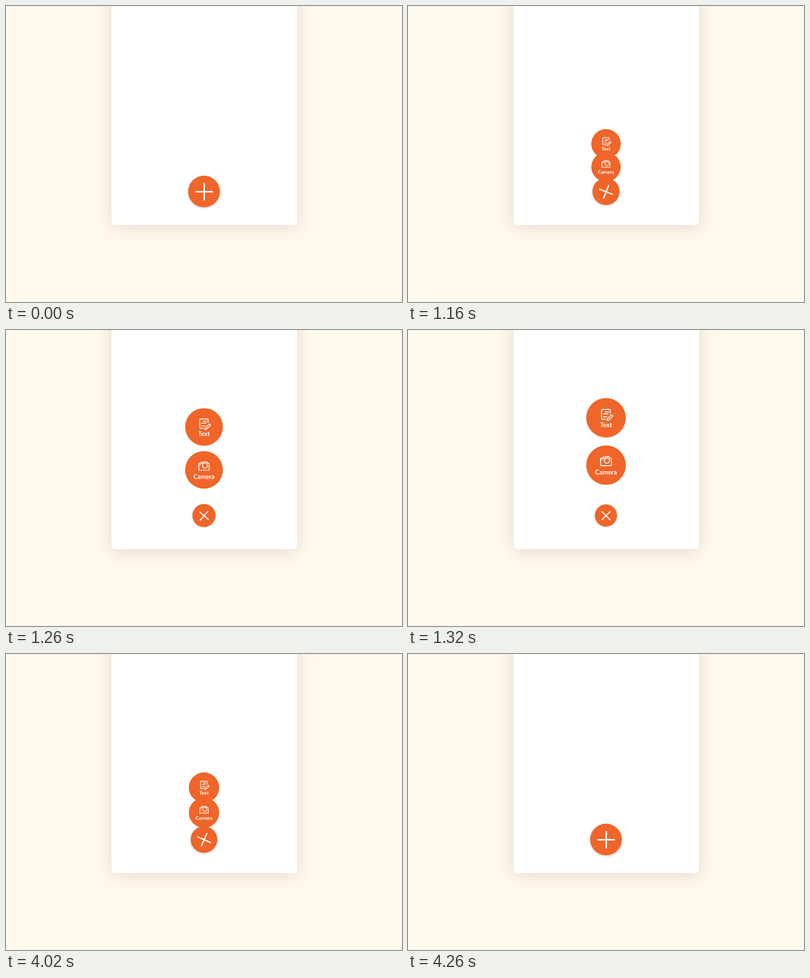
An HTML page with a canvas for the animation above (5.36 s loop, 800 px wide and 600 px high).

```html
<!DOCTYPE html>
<html lang="en">
<head>
<meta charset="utf-8">
<title>Add menu</title>
<style>
  html, body { margin: 0; width: 100%; height: 100%; overflow: hidden; background: #fff9ed; }
  canvas { display: block; width: 800px; height: 600px; }
</style>
</head>
<body>
<canvas id="stage" width="800" height="600"></canvas>
<script>
const ctx = document.getElementById('stage').getContext('2d');
const ORANGE = '#f06529';
const LOOP = 5360, STEP = 20;
const OPEN = { start: 1080, duration: 240, ease: bezier(0, 0, 0.58, 1) };
const CLOSE = { start: 3920, duration: 360, ease: bezier(0.25, 0.1, 0.25, 1) };
const HOME = { x: 400, y: 376 };

const noteIcon = new Path2D(
  'M8.6 -9.5V-15.2Q8.6 -17 6.8 -17H-7.2Q-9 -17 -9 -15.2V1.2Q-9 3 -7.2 3H-0.5' +
  'M-2 -12H5.3M-5 -8H4.5M-5.5 -2.2H1.8' +
  'M2 5.6L3.2 1.6L10.2 -5.5Q11.5 -6.6 12.8 -5.4T13 -2.7L6 4.4Z');
const cameraIcon = new Path2D(
  'M-4 -14H-9.5Q-11 -14 -11 -12.5V-0.5Q-11 1 -9.5 1H9.5Q11 1 11 -0.5V-12.5Q11 -14 9.5 -14H8' +
  'L6.3 -17H-1.5L-3.3 -14H-4M-5.5 -17.5V-14M-8.8 -10.7H-7.2' +
  'M7.2 -9A5.2 5.2 0 1 1 -3.2 -9A5.2 5.2 0 1 1 7.2 -9');

const items = [
  { label: 'Text', y: 178, icon: noteIcon },
  { label: 'Camera', y: 274, icon: cameraIcon }
];

function bezier(x1, y1, x2, y2) {
  const curve = (a, b, s) => 3 * a * s * (1 - s) ** 2 + 3 * b * s * s * (1 - s) + s ** 3;
  return x => {
    if (x <= 0) return 0;
    if (x >= 1) return 1;
    let low = 0, high = 1;
    for (let i = 0; i < 30; i++) {
      const mid = (low + high) / 2;
      if (curve(x1, x2, mid) < x) low = mid; else high = mid;
    }
    return curve(y1, y2, low);
  };
}

const phase = (t, { start, duration, ease }) => ease((t - start) / duration);

function setShadow(color, blur, dx, dy) {
  ctx.shadowColor = color;
  ctx.shadowBlur = blur;
  ctx.shadowOffsetX = dx;
  ctx.shadowOffsetY = dy;
}

function disc(radius) {
  ctx.fillStyle = ORANGE;
  ctx.beginPath();
  ctx.arc(0, 0, radius, 0, Math.PI * 2);
  ctx.fill();
}

function drawCard() {
  ctx.fillStyle = '#fff9ed';
  ctx.fillRect(0, 0, 800, 600);
  ctx.save();
  setShadow('rgba(0,0,0,0.12)', 36, 0, 4);
  ctx.fillStyle = '#fff';
  ctx.beginPath();
  ctx.roundRect(213, -220, 375, 664, 8);
  ctx.fill();
  ctx.restore();
}

function drawItem({ label, y, icon }, open) {
  const scale = 0.5 + 0.5 * open;
  ctx.save();
  ctx.translate(HOME.x, HOME.y + (y - HOME.y) * open);
  ctx.scale(scale, scale);
  disc(40);
  ctx.strokeStyle = ctx.fillStyle = '#fff';
  ctx.lineWidth = 1.8;
  ctx.lineCap = ctx.lineJoin = 'round';
  ctx.stroke(icon);
  ctx.font = '700 13px Lato, sans-serif';
  ctx.textAlign = 'center';
  ctx.fillText(label, 0, 19);
  ctx.restore();
}

function drawButton(open) {
  const scale = 1 - 0.3 * open;
  const angle = open * Math.PI / 4;
  const drop = 2 * scale;
  ctx.save();
  ctx.translate(HOME.x, HOME.y);
  ctx.rotate(angle);
  ctx.scale(scale, scale);
  // Canvas shadows ignore transforms, so the offset is turned by hand.
  setShadow('rgba(0,0,0,0.2)', 5 * scale, -drop * Math.sin(angle), drop * Math.cos(angle));
  disc(32);
  setShadow('transparent', 0, 0, 0);
  ctx.fillStyle = '#fff';
  ctx.fillRect(-17, -1, 35, 3);
  ctx.fillRect(-1, -17, 3, 35);
  ctx.restore();
}

function render(now) {
  const t = Math.floor((now % LOOP) / STEP) * STEP;
  const open = phase(t, OPEN) - phase(t, CLOSE);
  drawCard();
  if (open > 0) items.forEach(item => drawItem(item, open));
  drawButton(open);
}

const started = performance.now();
function tick() {
  render(performance.now() - started);
  requestAnimationFrame(tick);
}
tick();
</script>
</body>
</html>
```
